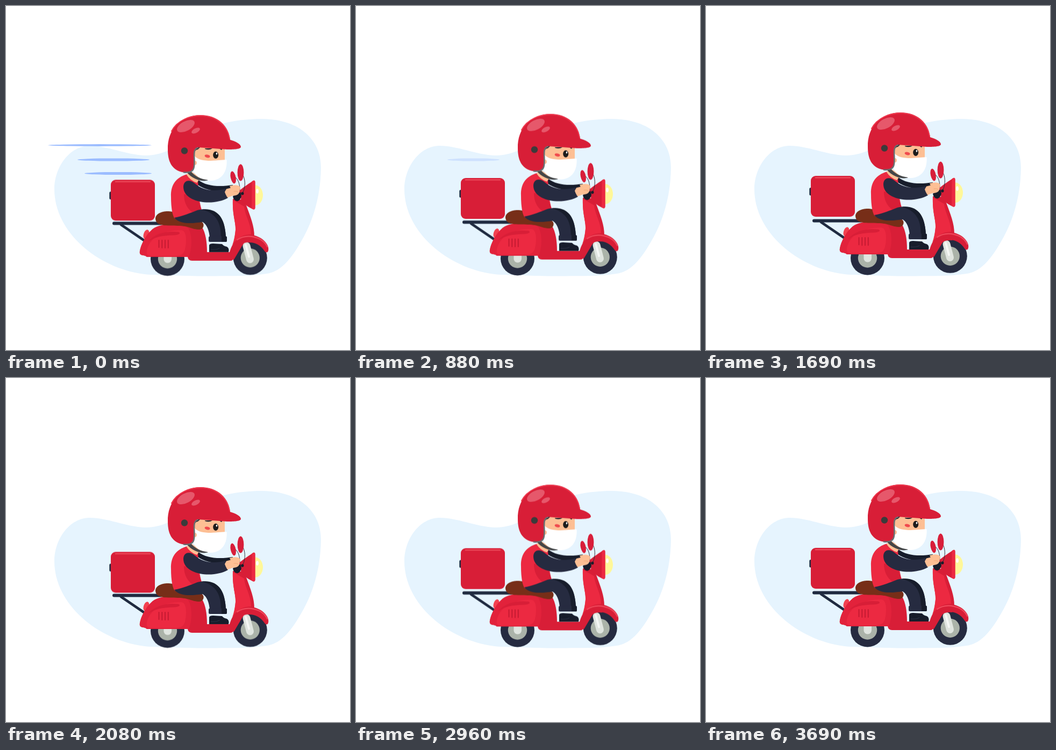
Recreate the animation shown at these times as an HTML page without scripts. Size 640 by 640 pixels, loop 3.83 s.

```html
<!DOCTYPE html>
<html lang="en">
<head>
<meta charset="utf-8">
<title>Scooter delivery</title>
<style>
  html, body { margin: 0; width: 100%; height: 100%; overflow: hidden; background: #fff; }
  svg { display: block; width: 100vw; height: 100vh; }

  .red { fill: #d81e37; }
  .bright { fill: #ec2941; }
  .navy { fill: #262b40; }
  .ink { fill: #171d2b; }
  .skin { fill: #fdbf94; }
  .steel { fill: #abb3a9; }
  .stroke { fill: none; stroke-linecap: round; }

  /* Suspension: each part sinks by its own amount */
  .ride { animation: bounce 3830ms infinite cubic-bezier(.45, 0, .55, 1); }
  .rear { --drop: 1.6px; }
  .front { --drop: 3.6px; }
  .body { --drop: 5.1px; }
  .box { --drop: 7.7px; }
  @keyframes bounce {
    0% { transform: translateY(calc(var(--drop) * .95)); }
    1.57%, 18.8%, 36.03%, 53.26%, 70.5%, 87.73% { transform: translateY(var(--drop)); }
    10.18%, 27.42%, 44.65%, 61.88%, 79.11%, 96.34%, 100% { transform: translateY(0); }
  }

  /* Speed lines shrink to the right while fading */
  .wind { fill: #9bbcff; animation: fade 3830ms linear infinite; }
  .wind ellipse {
    transform-box: fill-box; transform-origin: 100% 50%;
    animation: 3830ms ease-in-out infinite;
  }
  .wind .top { animation-name: shrink-top; }
  .wind .mid { animation-name: shrink-mid; }
  .wind .low { animation-name: shrink-low; }
  @keyframes fade { 34%, 100% { opacity: 0; } }
  @keyframes shrink-top { 0% { transform: none; } 20.9%, 100% { transform: scaleX(0); } }
  @keyframes shrink-mid { 0%, 10.2% { transform: none; } 45.4%, 100% { transform: scaleX(0); } }
  @keyframes shrink-low { 0%, 7.6% { transform: none; } 22.5%, 100% { transform: scaleX(0); } }
</style>
</head>
<body>
<svg viewBox="0 0 640 640">
  <path fill="#e6f4fe" d="M90 341C90 300 118 260 156 260C190 260 230 279 262 278C320 276 340 232 410 217C432 212 456 210 475 210C540 210 586 243 586 302C585 358 570 405 545 445C530 470 512 494 485 498C455 503 420 502 390 502.5C350 503 300 501 270 500C180 495 90 425 90 341Z"/>

  <g class="wind">
    <ellipse class="top" cx="174.5" cy="259" rx="96.5" ry="1.9"/>
    <ellipse class="mid" cx="200" cy="286" rx="67" ry="2.6"/>
    <ellipse class="low" cx="208.5" cy="311.5" rx="62.5" ry="2.6"/>
  </g>

  <g class="ride rear">
    <circle class="navy" cx="300.5" cy="469" r="31.5"/>
    <circle class="steel" cx="300.5" cy="469" r="17.7"/>
    <rect x="293.5" y="450" width="14.5" height="26.5" rx="7" fill="#e0e5e0"/>
  </g>

  <g class="ride front">
    <circle class="navy" cx="454.3" cy="465.3" r="31.5"/>
    <circle class="steel" cx="454.3" cy="465.3" r="17.6"/>
  </g>

  <g class="ride body">
    <path class="stroke" stroke="#1f2a40" stroke-width="6" d="M201 399.5H288"/>
    <path class="stroke" stroke="#1f2a40" stroke-width="4.6" d="M214 402L258 432"/>
  </g>

  <g class="ride box">
    <rect class="navy" x="192.3" y="338" width="6" height="14.5" rx="2.5"/>
    <rect class="red" x="195" y="316" width="82" height="76" rx="9"/>
    <path class="stroke" stroke="#ee4a5b" stroke-width="2.4" d="M204 319.4H268"/>
  </g>

  <g class="ride body">
    <!-- rear cowl and floor -->
    <ellipse cx="261" cy="420" rx="5" ry="9" fill="#f2414f" transform="rotate(18 261 420)"/>
    <path class="red" d="M273 410C285 400 310 400 330 403L365 407C371 417 374 433 374 453H416L425 463Q423 469 417 469H346Q339 469 338 462H262C259 457 247 462 249 451C251 439 260 421 273 410Z"/>
    <path fill="#e2223b" d="M273 410C290 398 325 401 338 407C348 420 346 448 340 462H262C259 457 247 462 249 451C251 439 260 421 273 410Z"/>
    <path class="bright" d="M262 450C266 428 290 412 326 412C337 413 336 435 333 448C331 456 326 460 316 460H268C262 459 261 456 262 450Z"/>
    <path class="red" d="M264 434C276 418 300 413 321 415.500C326 418 322 421 312 421.500C290 422 276 425 264 434Z"/>
    <path class="stroke" stroke="#c81b33" stroke-width="2.2" d="M284.500 431v13M290.300 431v14M296 431v14M301.800 431v14"/>
    <path fill="#772e18" d="M278 391C278 382 289 376.500 303 377C315 378 318 381 330 384L363 396C370 399 369 410 360 411C346 411 340 404 320 404C300 403 279 406 278 391Z"/>

    <!-- leg shield, fender, fork -->
    <path class="red" d="M422 354C421 385 428 398 427 412C426 430 421 448 414 456L424 467L440 440L462 424C462 404 455 388 447 366L440 355Z"/>
    <path class="bright" d="M422 356C421 385 428 398 427 412C426 422 424 432 421 440C432 424 444 420 456 420C456 400 445 386 443 368Z"/>
    <path class="red" d="M414 469C415 440 430 421 453 421C476 421 491 440 488 450C487 455 483 454 481 451C472 437 456 432 443 437C429 442 426 455 424 463Q422 469 414 469Z"/>
    <path class="stroke" stroke="#f0485b" stroke-width="2.2" d="M430 430C448 418 477 424 486 443"/>
  </g>
  <g class="ride front">
    <path class="stroke" stroke="#e0e5e0" stroke-width="14" d="M447.500 443L454 468"/>
    <path class="stroke" stroke="#f5f7f5" stroke-width="4" d="M446 441L452 463"/>
    <path class="red" d="M437 433Q447 427 458 431V436Q447 435 438 440Z"/>
  </g>

  <g class="ride body">
    <!-- headlight and mirrors -->
    <ellipse cx="463" cy="347.300" rx="15" ry="19" fill="#fff799"/>
    <ellipse cx="467.500" cy="339.500" rx="2.400" ry="4.300" fill="#fff"/>
    <path class="red" d="M460 320Q463.500 318.500 463.500 323V370Q463.500 375 459 373C448 368 440 362 436 352L434 339C443 331 453 325 460 320Z"/>
    <path class="bright" d="M457.500 321.500L460 320Q463.500 318.500 463.500 323V370Q463.500 375 459 373L457 372Z"/>
    <path class="ink" d="M422 349L436 341L438 349C436 356 432 359 429 358C425 357 423 354 422 349Z"/>
    <g class="stroke" stroke="#2b2f3a" stroke-width="1">
      <path d="M427 314C434 320 435 330 435 338"/>
      <path d="M441 310C447 322 444 336 440 344"/>
    </g>
    <ellipse cx="422.700" cy="314" rx="4.800" ry="11.600" fill="#d81e3a" transform="rotate(-12 422.700 314)"/>
    <ellipse cx="436.500" cy="305" rx="5.900" ry="15.600" fill="#d81e3a"/>
    <circle class="ink" cx="439.800" cy="344" r="2.700"/>

    <!-- rider -->
    <path class="ink" d="M357 318C372 331 398 332 422 328L422 335C400 343 375 340 357 328Z"/>
    <path class="skin" d="M416 330Q430 326 435 331L436 336L420 338Z"/>
    <path class="bright" d="M341 307C319 312 306 325 307 350C307 372 310 386 314 391L345 389L365 377C359 362 358 335 357 319Z"/>
    <path class="red" d="M331 345C331 362 338 374 350 381L365 377C360 366 358 357 357 350Z"/>
    <path class="skin" d="M336 309L342 301L362 315L355 324Q343 320 336 309Z"/>
    <path class="navy" d="M313 389C330 386 343 380 356 375C388 368 403 388 406 404Q409 416 409 426H379C378 413 374 402 366 397C350 399 325 403 313 389Z"/>
    <path class="ink" d="M364 373.500C396 370 408 392 409 426H400C400 402 394 381 364 373.500Z"/>
    <rect class="navy" x="377" y="423.500" width="34" height="10.500" rx="2.500"/>
    <path class="ink" d="M401 423.500H408.500Q411 423.500 411 426V431.500Q411 434 408.500 434H401Z"/>
    <path class="ink" d="M378 453V440Q379 437 385 437L402 438Q405 442 411 443Q416 446 414 453Z"/>
    <path class="stroke" stroke="#2d3448" stroke-width="1.200" d="M381 448Q391 449 397 446"/>
    <path class="navy" d="M330 331C331 318 343 318 351 325C366 338 386 341 408 335L413 352C396 362 366 364 346 354C335 348 330 341 330 331Z"/>
    <path class="skin" d="M410 335.500L424 332Q432 332 435 337L433 344Q430 348 422 348L412 351.500Q408 345 407 341Z"/>
    <path class="stroke" stroke="#eca878" stroke-width="1" d="M424 340Q430 339 433 342"/>

    <!-- head -->
    <path class="skin" d="M349 258H407V290L350 298Z"/>
    <path class="ink" d="M350 258H361L357 262Q353 262 351 267ZM370 260H384Q378 264 370 261ZM396 260H403L401 263Z"/>
    <path fill="#fff" d="M351 274C356 281 368 283 381 283L410.500 281C412 302 403 319 381 320C365 320 351 312 349 300Z"/>
    <circle class="skin" cx="351" cy="287" r="4"/>
    <ellipse cx="374.600" cy="274.400" rx="5" ry="2.800" fill="#f04a4e" transform="rotate(12 374.600 274.400)"/>
    <ellipse cx="390.200" cy="272.300" rx="5" ry="6.600" fill="#1c1c1c"/>
    <ellipse cx="392" cy="269.800" rx="1.300" ry="2" fill="#fff"/>
    <path fill="#444648" d="M336 304L344 303C352 312 362 317 376 319C368 323 348 319 336 304Z"/>
    <path class="red" d="M362 198C394 198 414 218 417 244C427 247 437 252 437 257C437 262 421 262 411 262C395 261 375 259 357 258C347 262 353 280 350 296C348 305 336 306 327 304C308 299 301 284 301 262C300 225 325 198 362 198Z"/>
    <path class="stroke" stroke="#f0354b" stroke-width="2" d="M308 228C328 189 406 186 416 242"/>
    <path class="stroke" stroke="#6b6d70" stroke-width="2.600" d="M357 259C345 261 353 282 349.500 296Q347 306 331 304.500"/>
    <circle cx="332" cy="264.500" r="6.200" fill="#3b3b3b"/>
    <g fill="#e6586b">
      <ellipse cx="334.500" cy="218.500" rx="18" ry="9" transform="rotate(-28 334.500 218.500)"/>
      <ellipse cx="353" cy="227" rx="8.700" ry="4.300" transform="rotate(-28 353 227)"/>
    </g>
  </g>
</svg>
</body>
</html>
```
